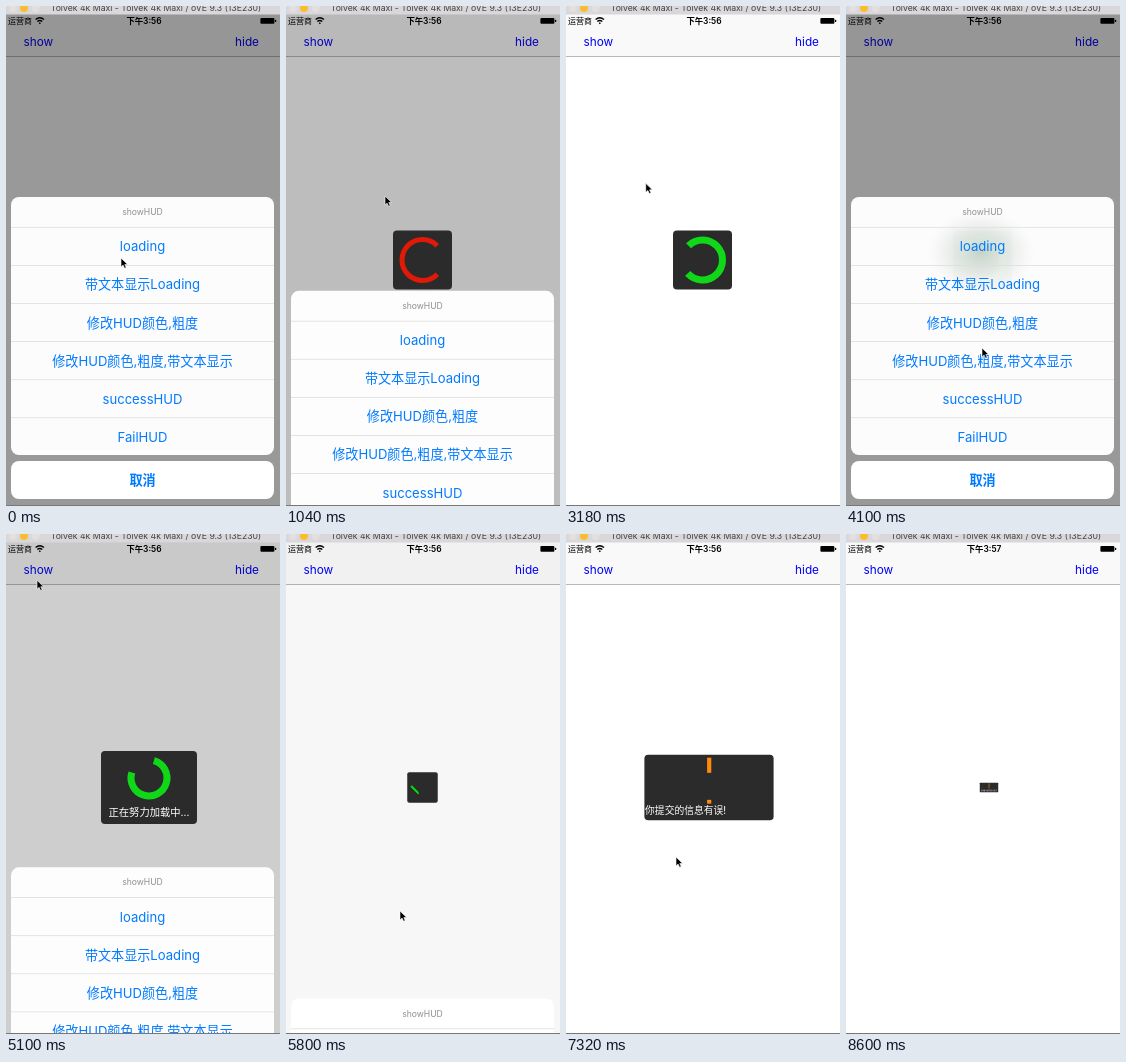
Recreate the animation shown at these times as an HTML page. Size 274 by 500 pixels, loop 8620 ms.

```html
<!DOCTYPE html>
<html lang="zh-CN">
<head>
<meta charset="utf-8">
<title>HUD demo</title>
<style>
html, body { margin: 0; width: 100%; height: 100%; overflow: hidden; background: #fff; }
svg { display: block; width: 100vw; height: 100vh; }
text { font-family: Inter, "Noto Sans CJK SC", "Noto Sans CJK", sans-serif; }
.mid { text-anchor: middle; }
.bar { font-size: 11.8px; fill: #00f; }
.status { font-size: 8px; fill: #000; }
.row { font-size: 13.1px; fill: #007aff; text-anchor: middle; }
</style>
</head>
<body>
<svg viewBox="0 0 274 500">
  <defs>
    <radialGradient id="glow">
      <stop offset="0" stop-color="#8fb096" stop-opacity=".5"/>
      <stop offset=".5" stop-color="#a9bcae" stop-opacity=".28"/>
      <stop offset="1" stop-color="#c8d0ca" stop-opacity="0"/>
    </radialGradient>
    <clipPath id="panelClip"><rect x="5" y="191" width="263" height="258" rx="8"/></clipPath>
    <clipPath id="hudClip"><rect id="hudClipBox" rx="4"/></clipPath>
  </defs>

  <rect width="274" height="500" fill="#fff"/>
  <rect y="8" width="274" height="42.5" fill="#f9f9f9"/>
  <rect y="50" width="274" height="1" fill="#b8b8b8"/>
  <text class="status" x="2" y="18">运营商</text>
  <g fill="none" stroke="#000" stroke-width="1.3">
    <path d="M29.6 13.6Q33.8 9.8 38 13.6M31.3 15.6Q33.8 13.3 36.3 15.6"/>
    <circle cx="33.8" cy="17.2" r=".5" fill="#000" stroke-width=".8"/>
  </g>
  <text id="clock" class="status mid" x="138" y="18" font-weight="600" style="font-size:8.4px"></text>
  <rect x="254.4" y="12" width="14" height="5.8" rx="1"/>
  <rect x="269" y="13.8" width="1.2" height="2.2" rx=".5"/>
  <text class="bar" x="17.5" y="40.3">show</text>
  <text class="bar" x="253" y="40.3" text-anchor="end">hide</text>

  <rect id="dim" y="8" width="274" height="492"/>
  <g id="hud">
    <rect id="box" rx="4" fill="#2c2b2b"/>
    <g clip-path="url(#hudClip)">
      <path id="ring" fill="none"/>
      <path id="check" d="M-22 -3L-8.5 10.5L22 -14" pathLength="1" fill="none" stroke="#00e010" stroke-width="4"/>
      <g id="bang" fill="#ff8a0c">
        <rect id="stem" x="-2" y="-31.4" width="4.4"/>
        <rect x="-2" y="13" width="4.4" height="4"/>
      </g>
      <text id="label" class="mid" fill="#fff" font-size="10.3"></text>
    </g>
  </g>

  <g id="sheet">
    <rect x="5" y="191" width="263" height="258" rx="8" fill="#fff" fill-opacity=".97"/>
    <g clip-path="url(#panelClip)"><ellipse id="ghost" cx="135" rx="54" ry="42" fill="url(#glow)"/></g>
    <g id="rows"></g>
    <rect x="5" y="455" width="263" height="38" rx="8" fill="#fff"/>
    <text class="row" x="136.5" y="478.7" font-weight="600">取消</text>
  </g>

  <rect width="274" height="8.5" fill="#d9d7d9"/>
  <circle cx="7" cy="2" r="4" fill="#e3dfdf"/>
  <circle cx="18" cy="2" r="4" fill="#f9bd2e"/>
  <circle cx="29.5" cy="2" r="4" fill="#e3dfdf"/>
  <text class="mid" x="150" y="5" font-size="8.7" fill="#444">Tolvek 4k Maxi - Tolvek 4k Maxi / oVE 9.3 (13E230)</text>
  <rect y="499" width="274" height="1" fill="#777"/>
  <path id="cursor" d="M0 0V9L2.1 7.1L3.6 10.3L5.2 9.6L3.8 6.5H6.6Z" fill="#000" stroke="#fff" stroke-width=".6"/>
</svg>
<script>
const LOOP = 8620, SLIDE = 180, TRAVEL = 309, POP = 120;
const $ = id => document.getElementById(id);
const set = (el, attrs) => { for (const k in attrs) el.setAttribute(k, attrs[k]); };
const clamp = x => Math.max(0, Math.min(1, x));
const smooth = x => x * x * (3 - 2 * x);
const easeOut = x => 1 - (1 - x) ** 3;

// [opens, closes] of the action sheet
const sheets = [[-500, 200], [982, 1440], [2346, 2800], [3720, 4160], [5060, 5659], [6560, 7120]];

const RED = '#e01a06', GREEN = '#10d818', WAIT = '正在努力加载中...';
const plain = { x: 136.5, y: 254, w: 59, h: 59 };
const wide = { x: 143, y: 253.5, w: 96, h: 73, text: WAIT, textY: 28.5 };
const huds = [
  { ...plain, from: 280, to: 1520, ring: RED, r: 20.5, line: 5, ref: 1040, angle: 43 },
  { ...wide, from: 1520, to: 2880, ring: RED, r: 18.5, line: 5, ref: 2400, angle: 0 },
  { ...plain, from: 2880, to: 4240, ring: GREEN, r: 20, line: 7, ref: 2880, angle: 0 },
  { ...wide, from: 4240, to: 5740, ring: GREEN, r: 18, line: 7, ref: 4240, angle: 0 },
  { ...plain, y: 253.5, from: 5739, to: 6540, check: true, shrink: true },
  { x: 143, y: 253.5, w: 136, h: 69, from: 7207, to: 8620, bang: true, shrink: true,
    text: '很抱歉,你提交的信息有误!', textY: 28 }
];

// time, x, y of the pointer tip
const moves = [
  [0, 115, 252], [260, 115, 252], [780, 30, 42], [960, 30, 42], [1040, 99, 190], [1140, 137, 277],
  [1500, 137, 279], [2180, 30, 42], [2440, 30, 42], [2700, 130, 314], [2880, 130, 314],
  [3480, 30, 42], [3740, 30, 42], [3980, 135, 338], [4100, 136, 342], [4240, 136, 342],
  [4860, 30, 42], [5080, 30, 42], [5400, 112, 386], [5720, 114, 386], [5800, 114, 377],
  [6340, 30, 42], [6580, 30, 42], [6860, 110, 425], [7150, 110, 425], [7320, 110, 323],
  [7640, 110, 321], [7920, 34, 60], [8040, 18, -14]
];

const rowNames = ['loading', '带文本显示Loading', '修改HUD颜色,粗度', '修改HUD颜色,粗度,带文本显示', 'successHUD', 'FailHUD'];
$('rows').innerHTML =
  '<text class="mid" x="136.5" y="209.2" font-size="8.6" fill="#8f8f8f">showHUD</text>' +
  rowNames.map((name, i) => {
    const y = 221.3 + i * 38.1;
    return `<rect x="5" y="${y - .4}" width="263" height=".8" fill="#dededf"/>` +
      `<text class="row" x="136.5" y="${y + 24}">${name}</text>`;
  }).join('');

function openness(t) {
  let p = 0;
  for (const [a, b] of sheets)
    if (t >= a) p = easeOut(clamp((t - a) / SLIDE)) - smooth(clamp((t - b) / SLIDE));
  return Math.max(0, p);
}

function arc(r, deg) {
  const at = d => {
    const a = d * Math.PI / 180;
    return `${(r * Math.cos(a)).toFixed(2)} ${(r * Math.sin(a)).toFixed(2)}`;
  };
  return `M${at(deg)}A${r} ${r} 0 1 1 ${at(deg + 272)}`;
}

const show = (el, on) => { el.style.display = on ? '' : 'none'; };

function drawHud(t, h) {
  show($('hud'), h);
  if (!h) return;
  const dt = t - h.from;
  let scale = clamp(dt / POP);
  if (h.shrink) scale = Math.min(scale, clamp((h.to - t) / 140));
  set($('hud'), { transform: `translate(${h.x} ${h.y}) scale(${Math.max(.01, scale)})` });
  const size = { x: -h.w / 2, y: -h.h / 2, width: h.w, height: h.h };
  set($('box'), size);
  set($('hudClipBox'), size);

  show($('ring'), h.ring);
  if (h.ring) set($('ring'), {
    d: arc(h.r, h.angle + (t - h.ref) * .75),
    stroke: h.ring, 'stroke-width': h.line,
    transform: `translate(0 ${h.text ? -9.5 : 0})`
  });
  show($('check'), h.check);
  set($('check'), { 'stroke-dasharray': `${clamp(dt / 180)} 2` });
  show($('bang'), h.bang);
  set($('stem'), { height: Math.min(38, dt * .14) });
  show($('label'), h.text);
  if (h.text) {
    $('label').textContent = h.text;
    set($('label'), { x: -.63 * Math.max(0, 180 - dt), y: h.textY });
  }
}

function drawCursor(t) {
  let i = 0;
  while (i < moves.length - 2 && t >= moves[i + 1][0]) i++;
  const [a, ax, ay] = moves[i], [b, bx, by] = moves[i + 1];
  const p = smooth(clamp((t - a) / (b - a)));
  set($('cursor'), { transform: `translate(${ax + (bx - ax) * p} ${ay + (by - ay) * p})` });
}

function draw(t) {
  const p = openness(t), off = TRAVEL * (1 - p);
  const hud = huds.find(h => t >= h.from && t < h.to);
  set($('dim'), { 'fill-opacity': .4 * p ** 1.2 });
  show($('sheet'), p > 0);
  set($('sheet'), { transform: `translate(0 ${off})` });
  set($('ghost'), { cy: 246 - off });
  show($('ghost'), hud);
  drawHud(t, hud);
  drawCursor(t);
  $('clock').textContent = t < 7950 ? '下午3:56' : '下午3:57';
}

const start = performance.now();
function tick() {
  draw((performance.now() - start) % LOOP);
  requestAnimationFrame(tick);
}
tick();
</script>
</body>
</html>
```
